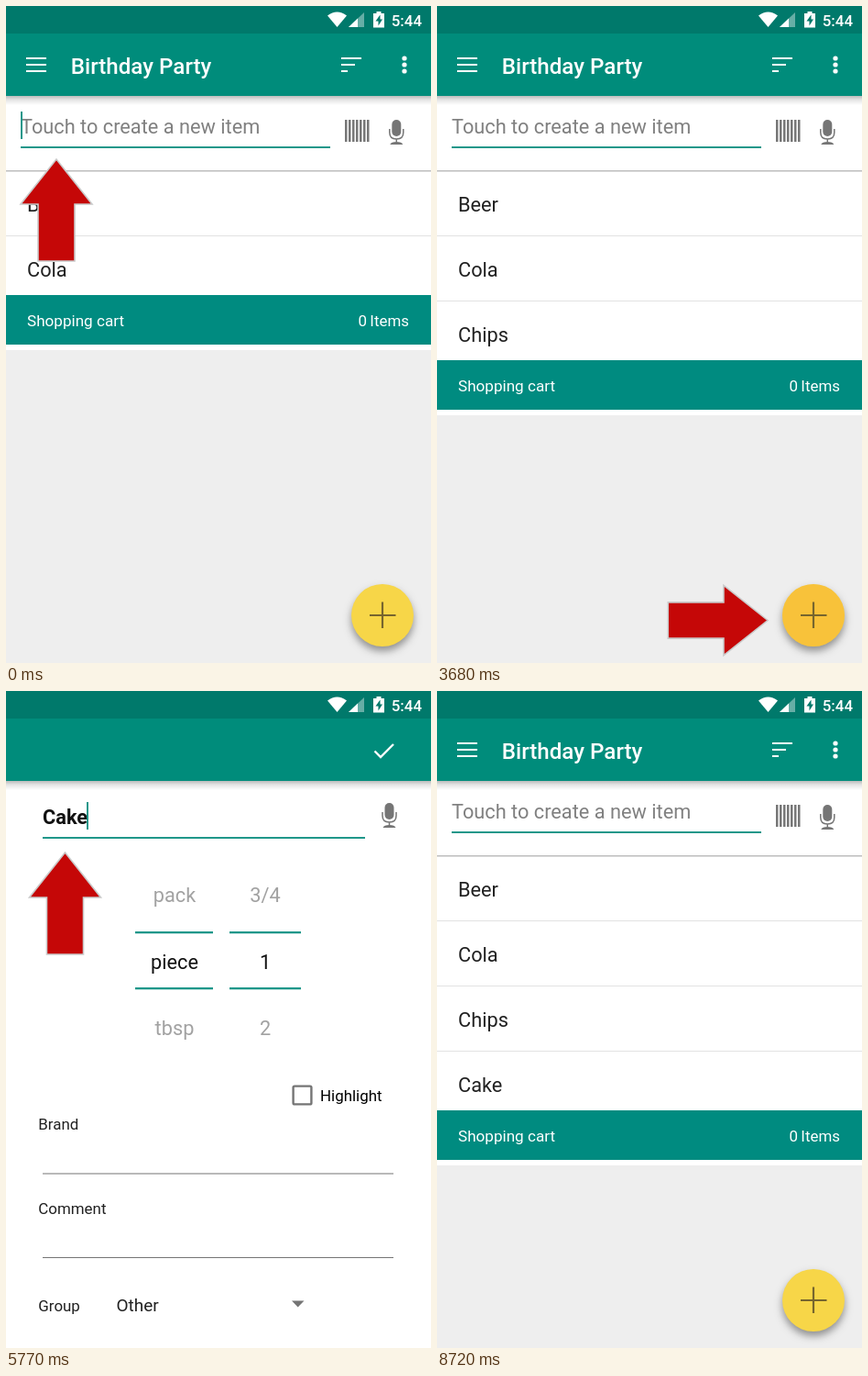
Recreate the animation shown at these times as an HTML page with a canvas. Size 464 px wide and 716 px high, loop 8780 ms.

```html
<!DOCTYPE html>
<html lang="en">
<head>
<meta charset="utf-8">
<title>Shopping list</title>
<style>
html, body { margin: 0; width: 464px; height: 716px; overflow: hidden; background: #fff; }
canvas { display: block; }
</style>
</head>
<body>
<canvas id="stage" width="464" height="716"></canvas>
<script>
const W = 464, H = 716, LOOP = 8780;
const BAR = '#008c7b', STATUS = '#00796b', CART = '#008b80', ACCENT = '#1f978a', GREY = '#757575', INK = '#212121';
const OPEN = 4160, CLOSE = 7350, STEP = 30, SLIDE = 57;
const SMALL = 16.92, BODY = 21.75, TITLE = 24.17;

const stage = document.getElementById('stage').getContext('2d');
const layer = Object.assign(document.createElement('canvas'), { width: W, height: H }).getContext('2d');
let c = stage;

// The caret switches at each of these times, starting visible.
const caretTimes = [0, 90, 210, 980, 1280, 1610, 1870, 2170, 2500, 2760, 3060, 3360, 3710, 4410,
  4730, 5010, 5310, 6070, 6370, 6660, 6960, 7290, 7800, 8160, 8420, 8720];
const caretOn = t => caretTimes.filter(s => s <= t).length % 2 === 1;
const clamp = x => Math.min(1, Math.max(0, x));
const typed = (word, t, start) => word.slice(0, Math.max(0, Math.floor((t - start) / 117) + 1));

function rect(x, y, w, h, color) {
  c.fillStyle = color;
  c.fillRect(x, y, w, h);
}

function text(str, x, y, size, color = INK, weight = 400, align = 'left') {
  c.font = `${weight} ${size}px Roboto, sans-serif`;
  c.textAlign = align;
  c.fillStyle = color;
  c.fillText(str, x, y);
  return c.measureText(str).width;
}

function fillPath(d, color) {
  c.fillStyle = color;
  c.fill(new Path2D(d));
}

function strokePath(d, color, width) {
  c.strokeStyle = color;
  c.lineWidth = width;
  c.stroke(new Path2D(d));
}

function disc(x, y, r, color) {
  c.fillStyle = color;
  c.beginPath();
  c.arc(x, y, r, 0, 7);
  c.fill();
}

function arrow(x, y, angle, scale = 1) {
  const d = 'M0 0L-49-39V-20H-111V20H-49V39Z';
  c.save();
  c.translate(x, y);
  c.rotate(angle);
  c.scale(scale, scale);
  fillPath(d, '#c50707');
  strokePath(d, '#cacaca', 1.6);
  c.restore();
}

function mic(x, y) {
  c.save();
  c.translate(x, y);
  c.beginPath();
  c.roundRect(-5, 0, 10, 18, 5);
  c.fillStyle = GREY;
  c.fill();
  strokePath('M-7.5 10V14Q-7.5 21 0 21Q7.5 21 7.5 14V10M0 21V25', GREY, 1.5);
  fillPath('M-7 27Q-6 24 0 24Q6 24 7 27Z', GREY);
  c.restore();
}

function caret(x, y) {
  rect(Math.round(x), y, 2, 30, ACCENT);
}

function windowFrame() {
  rect(0, 0, W, H, '#fff');
  rect(0, 0, W, 30, STATUS);
  rect(0, 30, W, 68, BAR);
  const shade = c.createLinearGradient(0, 98, 0, 108);
  shade.addColorStop(0, '#0004');
  shade.addColorStop(.4, '#0000001c');
  shade.addColorStop(1, '#0000');
  rect(0, 98, W, 10, shade);
}

function statusIcons() {
  fillPath('M361.5 23L351 10.500Q361.500 2.500 372 10.500Z', '#fff');
  fillPath('M391 7V23H374Z', '#fff6');
  fillPath('M384 13.500V23H374Z', '#fff');
  fillPath('M404.500 6h5v2h3.500v15.500h-12V8h3.500Z', '#fff');
  fillPath('M408.500 9.500L403.500 16.500H406.500V21.500L411 14.500H408.500Z', STATUS);
  text('5:44', 454, 21.5, SMALL, '#fff', 500, 'right');
}

function fab(pressed) {
  c.save();
  c.shadowColor = '#0006';
  c.shadowBlur = 8;
  c.shadowOffsetY = 5;
  disc(411, 664, 34, '#f7d648');
  c.restore();
  c.globalAlpha = pressed / 2;
  disc(411, 664, 34, '#f9b02c');
  c.globalAlpha = 1;
  strokePath('M397 664H425.500M411 649.500V678', '#76652e', 2.2);
}

function listScreen(t, items) {
  windowFrame();
  [22, 15, 7].forEach((w, i) => {
    rect(22, 56 + 7 * i, 22, 2, '#fff');
    rect(366, 56 + 7 * i, w, 2, '#fff');
    disc(435, 57 + 7 * i, 2.6, '#fff');
  });
  text('Birthday Party', 70.7, 74, TITLE, '#fff', 500);

  const entry = t < 1870 ? typed('Chips', t, 210) : '';
  const width = text(entry || 'Touch to create a new item', 16, 139, BODY, entry ? INK : '#808080');
  if (caretOn(t)) caret(entry ? 15 + width : 16, 115);
  rect(16, 153, 338, 2, ACCENT);
  for (let x = 370; x < 398; x += 4) rect(x, 124, 2.5, 24, '#777');
  mic(426.3, 124);
  rect(0, 179, W, 1.5, '#bdbdbd');

  items.forEach((item, i) => {
    text(item, 23, 223.5 + 71 * i, BODY);
    if (i < items.length - 1) rect(0, 250 + 71 * i, W, 1, '#e2e2e2');
  });
  const top = 173 + 71 * items.length;
  rect(0, top, W, 54, CART);
  text('Shopping cart', 23, top + 34, 17.1, '#fff');
  text('0', 384.5, top + 34, SMALL, '#fff');
  text('Items', 440, top + 34, SMALL, '#fff', 400, 'right');
  rect(0, top + 60, W, H, '#eee');
  fab(t < 3680 ? 0 : 1 - clamp((t - 3710) / 450));
  return top + 60;
}

function editScreen(t, greyFrom) {
  windowFrame();
  rect(0, greyFrom, W, H, '#eee');
  strokePath('M402.500 65.500L409 72L423 58', '#fff', 2.4);

  const width = text(typed('Cake', t, 5420), 40, 145, BODY, '#111', 700);
  if (caretOn(t)) caret(40 + (width && width - 1), 121);
  rect(40, 159, 352, 2, ACCENT);
  mic(418.5, 122);

  [['pack', '3/4'], ['piece', '1'], ['tbsp', '2']].forEach((row, i) => row.forEach((label, j) =>
    text(label, j ? 283 : 184, 230 + 72.5 * i, BODY, i === 1 ? '#111' : '#a2a2a2', 400, 'center')));
  for (const y of [262, 323]) {
    rect(141, y, 85, 2.3, ACCENT);
    rect(244, y, 78, 2.3, ACCENT);
  }

  c.beginPath();
  c.roundRect(313.6, 430.6, 19.8, 19.8, 1.5);
  c.strokeStyle = GREY;
  c.lineWidth = 2.4;
  c.stroke();
  text('Highlight', 343, 447, SMALL, '#000');
  text('Brand', 35.3, 478, SMALL);
  text('Comment', 35.3, 569.5, SMALL);
  text('Group', 35.3, 675.5, SMALL);
  text('Other', 120.5, 675.5, 19);
  rect(40, 525.5, 383, 1, GREY);
  rect(40, 617, 383, 1, GREY);
  fillPath('M312 664.500H325.500L318.700 671.500Z', GREY);

  c.globalAlpha = 1 - clamp((t - 4730) / 150);
  rect(456, 102, 4, 355, '#d6d6d6');
  c.globalAlpha = 1;
}

// Opacity and downward shift of the edit window.
function editPose(t) {
  if (t < OPEN || t >= CLOSE + 5 * STEP) return [0, 0];
  if (t < CLOSE) {
    const ms = Math.max(0, 75 * Math.floor((t - OPEN) / STEP) - 32);
    return [1 - (1 - clamp(ms / 200)) ** 4, Math.round(SLIDE * (1 - clamp(ms / 350)) ** 5)];
  }
  const p = (Math.floor((t - CLOSE) / STEP) + 1) / 6;
  return [clamp((1 - p) / .6), SLIDE * p ** 4];
}

function draw(t) {
  c = stage;
  const count = t < 1870 ? 2 : t < CLOSE ? 3 : 4;
  const listEnd = listScreen(t, ['Beer', 'Cola', 'Chips', 'Cake'].slice(0, count));

  const [alpha, shift] = editPose(t);
  if (alpha) {
    c = layer;
    editScreen(t, alpha < .8 ? listEnd - shift : H);
    c = stage;
    c.globalAlpha = alpha;
    c.drawImage(layer.canvas, 0, shift);
    c.globalAlpha = 1;
  }
  statusIcons();

  const up = -Math.PI / 2;
  if (t < 1870) arrow(55, 167, up);
  else if (t >= 2630 && t < OPEN) arrow(361, 669.5, 0, .98);
  else if (t >= 4880 && t < 6430) arrow(64.5, 176, up);
  else if (t >= 6540 && t < CLOSE) arrow(378, 65, 0);
}

function tick() {
  draw(performance.now() % LOOP);
  requestAnimationFrame(tick);
}
tick();
</script>
</body>
</html>
```
